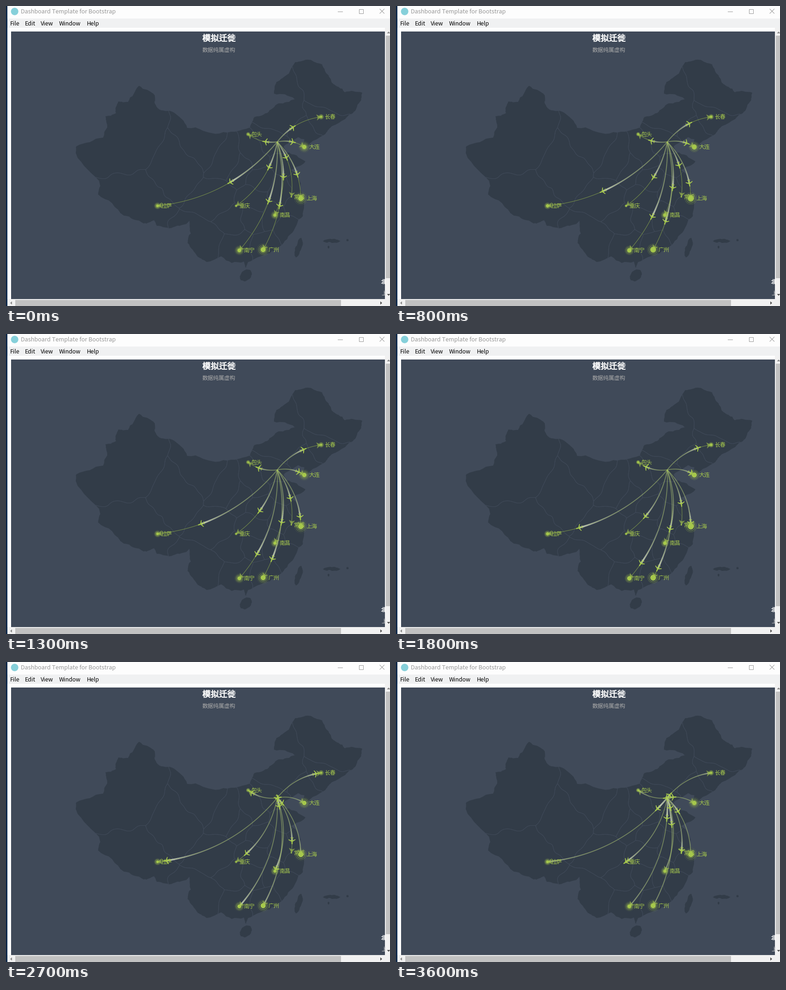
Animation of 831 by 647 pixels, one loop 3.7 s. Source, as a matplotlib script:

```python
import numpy as np
import matplotlib.pyplot as plt
from matplotlib.animation import FuncAnimation
from matplotlib.collections import LineCollection
from matplotlib.patches import Circle, Polygon, Rectangle
from matplotlib.patheffects import withStroke

W, H, DPI = 831, 647, 72
FRAMES, STEP = 37, 100
FLIGHT = 5480            # ms from start to end of a route
RIPPLE = FLIGHT * 2 / 3  # ms for one ripple ring
LEAD, STAGGER = 0.616, 0.0343  # progress of the first plane, lag per route
GREEN, PANEL, LAND = "#a6c84c", "#404a59", "#323c48"
FONT = "Noto Sans CJK JP"

HUB = np.array([587.0, 293.0])
CITIES = {
    "上海": (638, 415), "广州": (556.5, 525.5), "大连": (645.5, 304),
    "南宁": (505, 527), "南昌": (582, 451), "拉萨": (328, 431),
    "长春": (682, 239), "包头": (524, 276.5), "重庆": (498, 431),
    "常州": (617.5, 411.5),
}

# Corners of the mainland, clockwise; the detail between them is fractal
MAINLAND = [
    (626, 121), (656, 116), (684, 126), (694, 146), (705, 165), (733, 186),
    (771, 187), (768, 204), (757, 224), (737, 240), (704, 260), (690, 277),
    (640, 307), (646, 288), (632, 283), (601, 303), (606, 317), (648, 335),
    (617, 354), (637, 395), (645, 430), (629, 472), (600, 512), (565, 534),
    (524, 552), (519, 565), (515, 551), (466, 540), (434, 552), (415, 541),
    (393, 511), (400, 491), (397, 463), (362, 477), (326, 474), (320, 462),
    (298, 469), (255, 452), (199, 406), (204, 388), (151, 317), (152, 303),
    (210, 284), (219, 262), (215, 238), (238, 231), (243, 206), (264, 207),
    (288, 172), (322, 193), (328, 220), (362, 229), (392, 263), (462, 275),
    (528, 262), (537, 240), (565, 231), (590, 210), (625, 201), (580, 189),
    (585, 164), (612, 146),
]
# Province centres; the borders run halfway between neighbours
PROVINCES = [
    (265, 290), (285, 428), (375, 350), (430, 305), (455, 420), (430, 500),
    (490, 465), (500, 515), (560, 515), (535, 460), (540, 415), (575, 455),
    (605, 475), (630, 430), (597, 395), (630, 385), (553, 375), (600, 340),
    (580, 300), (540, 325), (508, 350), (480, 335), (600, 240), (645, 280),
    (690, 245), (705, 200),
]

# Right half of the 15 px plane, nose up
HALF_PLANE = [(0, 7.5), (0.8, 7.1), (1.25, 5.4), (1.25, 1.75), (7.5, -2.1),
              (7.5, -3.7), (1.04, -0.9), (0.8, -5.15), (3.43, -6.8),
              (3.42, -7.5), (0, -6.75)]
PLANE = np.array(HALF_PLANE + [(-x, y) for x, y in HALF_PLANE[-2:0:-1]])
ARROW = np.array([(0, 0), (6.67, -10), (0, -7.5), (-6.67, -10)])

rng = np.random.default_rng(7)
fig = plt.figure(figsize=(W / DPI, H / DPI), dpi=DPI, facecolor="white")
ax = fig.add_axes([0, 0, 1, 1])
ax.set(xlim=(0, W), ylim=(H, 0))
ax.axis("off")


def box(x0, y0, x1, y1, color, z=0):
    ax.add_patch(Rectangle((x0, y0), x1 - x0, y1 - y0, fc=color, lw=0,
                           antialiased=False, zorder=z))


def label(x, y, s, size, color, z=5, bold=0, **kw):
    effects = [withStroke(linewidth=bold, foreground=color)] if bold else None
    ax.text(x, y, s, fontsize=size, color=color, family=FONT, zorder=z,
            path_effects=effects, **kw)


def stroke(xs, ys, color="#999999", lw=1, z=12):
    ax.plot(xs, ys, color=color, lw=lw, zorder=z)


def shape(points, color, z=12, **kw):
    patch = Polygon(points, closed=True, fc=color, lw=0, zorder=z, **kw)
    return ax.add_patch(patch)


def pointer(x, y, dx, dy, color):
    """Scroll bar arrow with its tip in direction (dx, dy)."""
    shape([(x + 2 * dx, y + 2 * dy), (x - 2 * dx + 3.5 * dy, y - 2 * dy + 3.5 * dx),
           (x - 2 * dx - 3.5 * dy, y - 2 * dy - 3.5 * dx)], color)


def land(points, levels=3):
    """Closed area whose edge is roughened by midpoint displacement."""
    pts = np.array(points, float)
    for _ in range(levels):
        d = np.roll(pts, -1, axis=0) - pts
        normal = np.stack([-d[:, 1], d[:, 0]], axis=1)
        mid = pts + d / 2 + normal * rng.normal(0, 0.07, (len(pts), 1))
        pts = np.stack([pts, mid], axis=1).reshape(-1, 2)
    return shape(pts, LAND, z=2)


def island(x, y, a, b, tilt=0):
    q, c, s = np.arange(0, 2 * np.pi, np.pi / 4), *(f(np.radians(tilt)) for f in (np.cos, np.sin))
    u, v = a * np.cos(q), b * np.sin(q)
    land(np.stack([x + u * c - v * s, y + u * s + v * c], axis=1), 2)


def draw_borders(mainland):
    x, y = np.meshgrid(np.arange(140, 780, 2.0), np.arange(110, 570, 2.0))
    wx = x + 3 * np.sin(y / 8) + 2 * np.sin(x / 5 + y / 9)
    wy = y + 3 * np.sin(x / 9) + 2 * np.sin(y / 6 - x / 11)
    dist = np.array([np.hypot(wx - px, wy - py) for px, py in PROVINCES])
    for k, d in enumerate(dist):
        rest = np.delete(dist, k, axis=0).min(axis=0)
        lines = ax.contour(x, y, d - rest, [0], colors=PANEL, linewidths=0.8,
                           zorder=2.5)
        lines.set_clip_path(mainland)


def draw_window():
    box(0, 0, W, 27, "#fdfdfd")
    box(0, 27, W, 47, "#f0f1f2")
    box(11, 55, 820, 632, PANEL, 1)
    box(0, 0, 3, H, "#0e2c4e", 13)

    ax.add_patch(Circle((18.7, 11.8), 8, fc="#86d0da", lw=0, zorder=12))
    label(32, 16.3, "Dashboard Template for Bootstrap", 12.7, "#999999")
    for x, s in ((9, "File"), (41, "Edit"), (75, "View"), (115, "Window"),
                 (175, "Help")):
        label(x, 42, s, 12.4, "black")
    stroke([717.5, 727.5], [11.5, 11.5])
    ax.add_patch(Rectangle((763.5, 6.5), 9, 9, fill=False, ec="#999999", lw=1))
    stroke([809, 818.5], [6.5, 16])
    stroke([809, 818.5], [16, 6.5])

    # Scroll bars
    box(820, 47, W, H, "#f1f1f1", 10)
    box(3, 632, W, H, "#f1f1f1", 10)
    box(822, 64, W, 587, "#c1c1c1", 11)
    box(20, 634, 725, H, "#c1c1c1", 11)
    pointer(828, 57, 0, -1, "#8a8a8a")
    pointer(828, 623, 0, 1, "#505050")
    pointer(11, 640.5, -1, 0, "#8a8a8a")
    pointer(812, 640.5, 1, 0, "#505050")


def bend(end):
    mid, d = (HUB + end) / 2, end - HUB
    return mid + 0.2 * np.array([d[1], -d[0]])


def on_curve(end, t):
    t = np.asarray(t, float)[..., None]
    return (1 - t) ** 2 * HUB + 2 * t * (1 - t) * bend(end) + t ** 2 * end


def heading(end, t):
    c = bend(end)
    d = (1 - t) * (c - HUB) + t * (end - c)
    return d / np.hypot(*d)


def aim(points, pos, d):
    normal = np.array([-d[1], d[0]])
    return pos + points[:, 1:] * d + points[:, :1] * normal


draw_window()
draw_borders(land(MAINLAND))
island(519, 581, 15, 11, -45)
island(633, 521, 22, 6.5, -75)
island(705, 507, 19, 4)
island(698, 520, 2, 3)
island(739, 505, 2.5, 2.5)
label(461, 70.5, "模拟迁徙", 18, "white", bold=0.8, ha="center", va="center")
label(461, 95, "数据纯属虚构", 12, "#aaaaaa", ha="center", va="center")
label(812, 595.5, "北京", 12, "white", bold=0.6, va="center")
label(812, 620, "上海", 12, "#cccccc", va="center")

ends = [np.array(p, float) for p in CITIES.values()]
grid = np.linspace(0, 1, 121)
middle = (grid[:-1] + grid[1:]) / 2
segments, planes, rings = [], [], []
for k, (name, end) in enumerate(zip(CITIES, ends)):
    path, r = on_curve(end, grid), min(95, 100 - 10 * k) / 16
    segments.extend(np.stack([path[:-1], path[1:]], axis=1))
    stroke(path[:, 0], path[:, 1], (GREEN, 0.6), 1, 4)
    shape(aim(ARROW, end, heading(end, 1)), GREEN, z=4, alpha=0.6)
    planes.append(shape(PLANE, GREEN, z=4.5))
    label(end[0] + r + 5, end[1] + 0.5, name, 12, GREEN, va="center")
    ax.add_patch(Circle(end, r, fc=GREEN, lw=0, zorder=7))
    for j in range(3):
        ring = Circle(end, r, fill=False, ec=GREEN, lw=1, zorder=7)
        rings.append((ax.add_patch(ring), r, j / 3))

trails = LineCollection(segments, capstyle="butt", zorder=3)
ax.add_collection(trails)


def update(i):
    ms = i * STEP
    fades, ghosts = [], []
    for k, (plane, end) in enumerate(zip(planes, ends)):
        flown = LEAD - k * STAGGER + ms / FLIGHT
        t = flown % 1
        plane.set_xy(aim(PLANE, on_curve(end, t), heading(end, t)))
        # White trail behind the plane, with a faint stain where it has been
        passed = middle < flown
        age = (flown - middle) % 1 * FLIGHT
        fades.append(passed * np.exp(-age / 900))
        ghosts.append(passed * 0.13)
    fade = np.concatenate(fades)
    rgba = np.ones((fade.size, 4))
    rgba[:, 3] = np.concatenate(ghosts) + 0.72 * fade
    trails.set_color(rgba)
    trails.set_linewidth(2.2 + 1.5 * fade)
    for ring, r, offset in rings:
        p = (0.2 + offset + ms / RIPPLE) % 1
        ring.set_radius(r * (1 + 1.5 * p))
        ring.set_alpha(1 - p)
    return []


anim = FuncAnimation(fig, update, frames=FRAMES, interval=STEP, repeat=True,
                     repeat_delay=0, blit=False)
plt.show()
```
